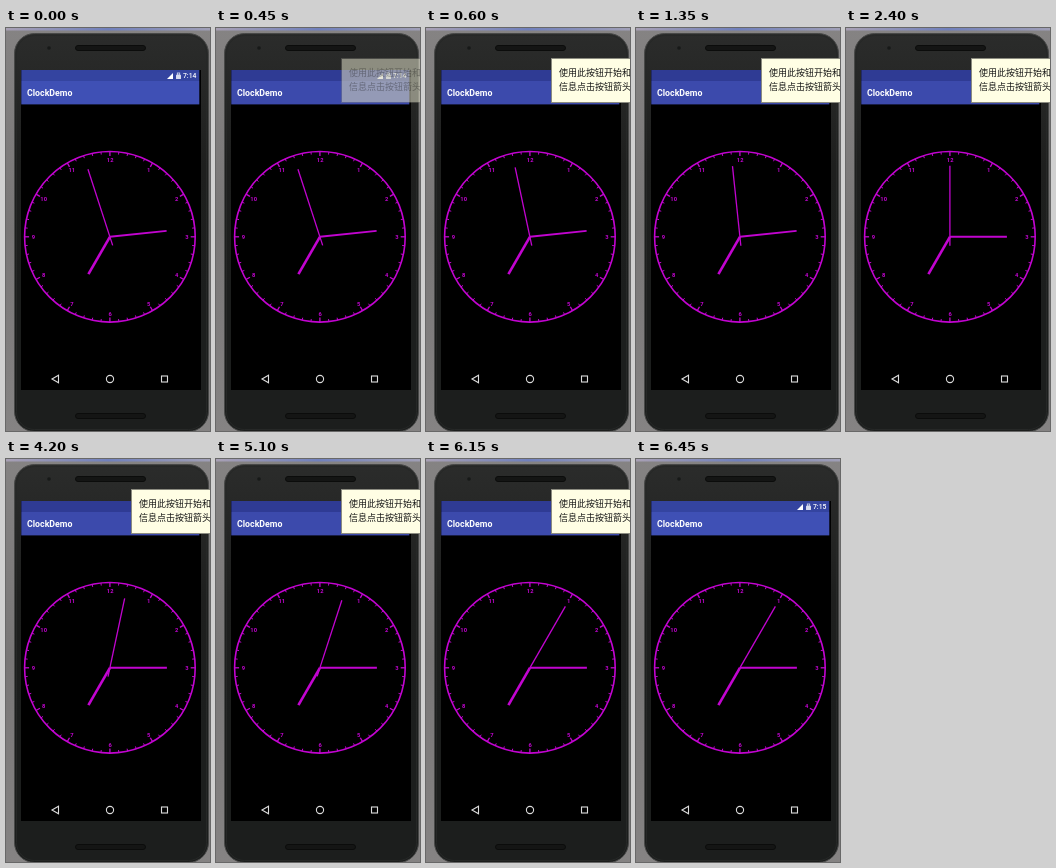
These frames come from a looping animation (204x403 px, 6600 ms). An HTML page with a canvas:

```html
<!DOCTYPE html>
<html lang="zh">
<head>
<meta charset="utf-8">
<title>ClockDemo</title>
<style>
  html, body { margin: 0; width: 100%; height: 100%; overflow: hidden; background: #777; }
  canvas { display: block; }
</style>
</head>
<body>
<canvas id="stage" width="204" height="403"></canvas>
<script>
const ctx = document.getElementById('stage').getContext('2d');
const LOOP = 6600;
const MAGENTA = '#c204d0';
const CENTER = { x: 103.9, y: 208.8 };
const RADIUS = 85.3;

// Start time of each shown second, counted from 7:14:00.
const TICKS = [[0, 57], [600, 58], [1350, 59], [2400, 60], [3300, 61], [4200, 62], [5100, 63], [6150, 65]];

function secondsAt(t) {
  return TICKS.filter(([start]) => start <= t).pop()[1];
}

function tooltipAlpha(t) {
  if (t < 450 || t >= 6450) return 0;
  return t < 600 ? 0.36 : 1;
}

function rect(x, y, w, h, fill) {
  ctx.fillStyle = fill;
  ctx.fillRect(x, y, w, h);
}

function roundRect(x, y, w, h, r, fill, stroke) {
  ctx.beginPath();
  ctx.roundRect(x, y, w, h, r);
  if (fill) { ctx.fillStyle = fill; ctx.fill(); }
  if (stroke) { ctx.strokeStyle = stroke; ctx.lineWidth = 1; ctx.stroke(); }
}

function circle(x, y, r) {
  ctx.beginPath();
  ctx.arc(x, y, r, 0, Math.PI * 2);
}

function polygon(...points) {
  ctx.beginPath();
  points.forEach(([x, y]) => ctx.lineTo(x, y));
  ctx.closePath();
}

function text(str, x, y, font, fill, align = 'left') {
  ctx.font = font;
  ctx.fillStyle = fill;
  ctx.textAlign = align;
  ctx.fillText(str, x, y);
}

function gradient(x0, y0, x1, y1, ...colors) {
  const g = ctx.createLinearGradient(x0, y0, x1, y1);
  colors.forEach((c, i) => g.addColorStop(i / (colors.length - 1), c));
  return g;
}

function polar(turn, r) {
  const a = turn * Math.PI * 2;
  return [CENTER.x + r * Math.sin(a), CENTER.y - r * Math.cos(a)];
}

function ray(turn, from, to, width) {
  ctx.beginPath();
  ctx.moveTo(...polar(turn, from));
  ctx.lineTo(...polar(turn, to));
  ctx.lineWidth = width;
  ctx.stroke();
}

function drawPhone() {
  rect(0, 0, 204, 403, gradient(0, 0, 0, 403, '#858383', '#787676', '#858383'));
  rect(0, 0, 204, 2.5, gradient(0, 0, 204, 0, '#a8a0b4', '#7080bc', '#a09fb6'));
  const body = gradient(0, 5, 0, 403, '#2b2c2b', '#1e1f1e', '#1c1e1d', '#1c1e1d');
  roundRect(8.5, 5.5, 194, 398, 20, body, '#484948');
  roundRect(10.5, 7.5, 190, 394, 18, null, '#262827');

  for (const y of [17, 385]) {
    roundRect(69.5, y + 0.5, 70, 5, 2.5, '#141514', '#0b0c0b');
  }
  circle(43, 20, 1.8);
  ctx.fillStyle = '#171918';
  ctx.fill();
  rect(15, 42, 180, 320, '#000');
}

function drawNavigation() {
  ctx.strokeStyle = '#dcdcdc';
  ctx.lineWidth = 1.1;
  polygon([46, 351], [52.5, 347.3], [52.5, 354.7]);
  ctx.stroke();
  circle(104, 351, 3.6);
  ctx.stroke();
  ctx.strokeRect(155.5, 348, 6, 6);
}

function drawBars(dimmed, minute) {
  rect(15.3, 42, 178, 11, dimmed ? '#2f3b94' : '#3444a0');
  rect(15.3, 53, 178, 23.4, dimmed ? '#3c4aac' : '#3f50b5');
  text('ClockDemo', 21, 68.4, '700 8.8px Roboto, sans-serif', '#fff');

  ctx.fillStyle = '#fff';
  polygon([161, 51], [167, 45], [167, 51]);
  ctx.fill();
  roundRect(170, 46.8, 5, 4.2, 0.5, '#d5d9ee');
  ctx.strokeStyle = '#d5d9ee';
  ctx.lineWidth = 0.8;
  ctx.strokeRect(171.3, 45, 2.4, 2);
  text('7:' + minute, 177, 50.3, '500 6.8px Roboto, sans-serif', '#fff');
}

function drawClock(seconds) {
  ctx.strokeStyle = MAGENTA;
  circle(CENTER.x, CENTER.y, RADIUS);
  ctx.lineWidth = 1.6;
  ctx.stroke();

  for (let i = 0; i < 60; i++) {
    const major = i % 5 === 0;
    ray(i / 60, RADIUS - (major ? 4.5 : 2.6), RADIUS, major ? 1.3 : 1);
  }
  for (let n = 1; n <= 12; n++) {
    const [x, y] = polar(n / 12, 76.8);
    text(n, x + 0.3, y + 2.2, '700 5.8px Roboto, sans-serif', MAGENTA, 'center');
  }

  const minute = 14 + Math.floor(seconds / 60);
  ray(7 / 12, 0, 43, 2.6);
  ray(minute / 60, 0, 57, 1.9);
  ray(seconds / 60, -9, 71, 1.3);
}

function drawTooltip(alpha) {
  if (!alpha) return;
  const font = '9px "Noto Sans CJK SC", "Noto Sans CJK", sans-serif';
  ctx.globalAlpha = alpha;
  rect(125, 30, 79, 45, '#8b8b80');
  rect(126, 31, 78, 43, '#fffee4');
  text('使用此按钮开始和', 133, 48, font, '#151515');
  text('信息点击按钮箭头', 133, 61.5, font, '#151515');
  ctx.globalAlpha = 1;
}

function draw(t) {
  const alpha = tooltipAlpha(t);
  drawPhone();
  drawBars(alpha > 0, t >= 6450 ? 15 : 14);
  drawNavigation();
  drawClock(secondsAt(t));
  drawTooltip(alpha);
}

const start = performance.now();
function frame() {
  draw((performance.now() - start) % LOOP);
  requestAnimationFrame(frame);
}
frame();
</script>
</body>
</html>
```
